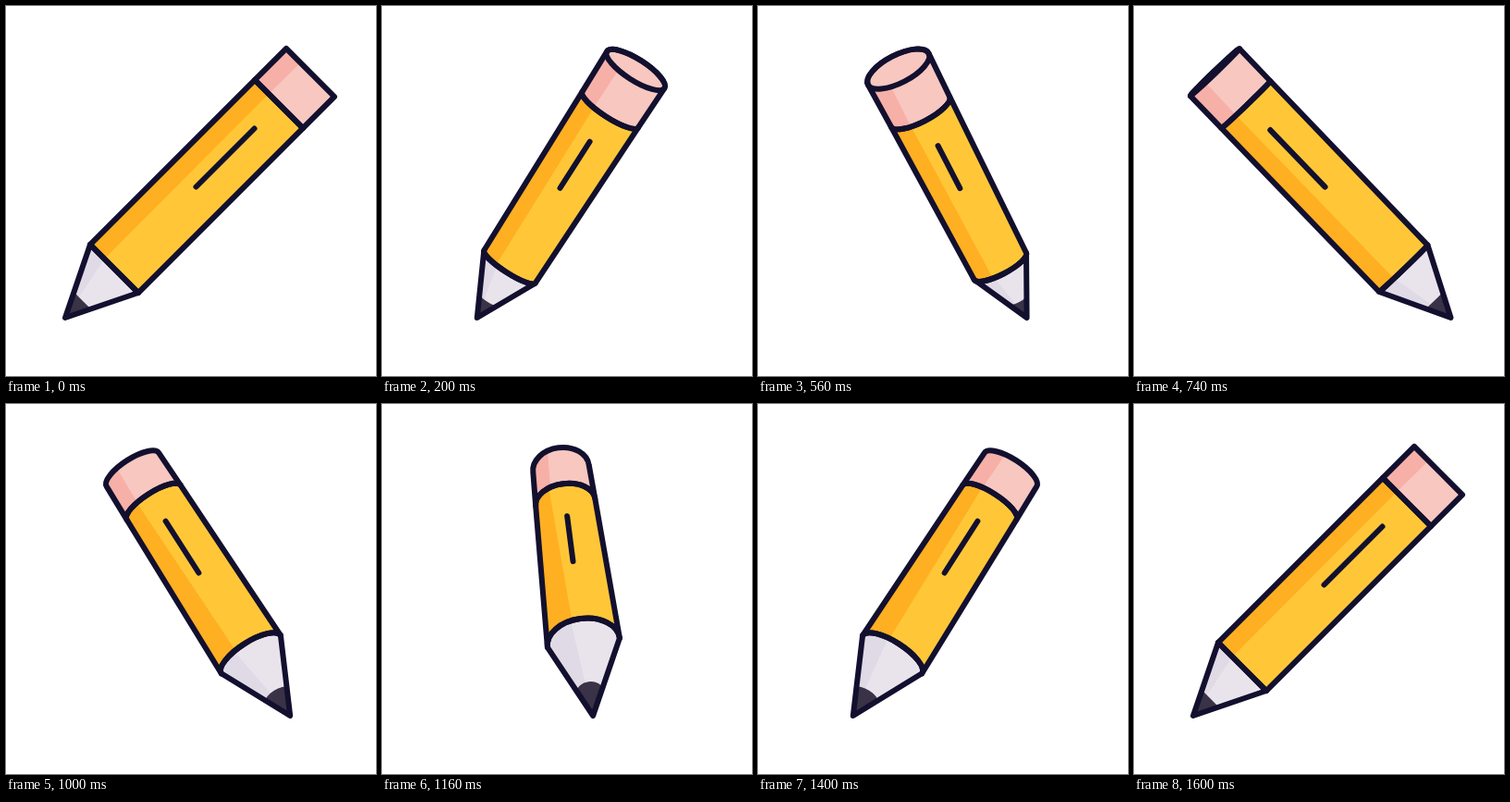
An HTML page with a canvas for the animation above (1620 ms loop, 400 by 400 pixels).

```html
<!DOCTYPE html>
<html lang="en">
<head>
<meta charset="utf-8">
<title>Spinning pencil</title>
<style>
  html, body { margin: 0; width: 100%; height: 100%; overflow: hidden; background: #fff; }
  canvas { display: block; width: 400px; height: 400px; }
</style>
</head>
<body>
<canvas id="stage" width="400" height="400"></canvas>
<script>
const ctx = document.getElementById('stage').getContext('2d');
const LOOP = 1620, TURN = 1600, STEP = 20;
const INK = '#12102e';

// Rings: [height above the tip, half width, bulge, shade edge] for each view.
const RINGS = {
  base: { side: [53, 36.8, 0, -15], front: [57, 29, -13.5, -12], back: [79.5, 39.4, 27, -8] },
  seam: { side: [231, 36.8, 0, -15.5], front: [218.5, 35, -17, -17], back: [230.5, 32.2, 21, -15] },
  top: { side: [265, 36.8, 0, -15], front: [271, 37, -23, -16], back: [267, 30.3, 23.5, -13] }
};
// Both ends of the line on the barrel.
const MARK = { side: [141.5, 204.5], front: [139, 176], back: [167.5, 216] };

// depth: 1 = eraser towards the viewer, -1 = away
function mix(views, depth) {
  const to = depth > 0 ? views.front : views.back;
  return views.side.map((v, i) => v + (to[i] - v) * Math.abs(depth));
}

function arc(ring, leftToRight) {
  const up = ring.b >= 0;
  ctx.ellipse(0, -ring.y, ring.w, Math.abs(ring.b), 0,
    leftToRight ? Math.PI : 0, leftToRight ? 0 : Math.PI, leftToRight ? !up : up);
}

// A section of the pencil between two rings, lit from the right.
function section(low, high, light, dark) {
  const path = () => {
    ctx.beginPath();
    if (low.w) arc(low, true); else ctx.moveTo(0, 0);
    arc(high, false);
    ctx.closePath();
  };
  const edge = t => [low.k + (high.k - low.k) * t, -low.y - (high.y - low.y) * t];
  path();
  ctx.fillStyle = light;
  ctx.fill();
  ctx.save();
  ctx.clip();
  const from = edge(-1), to = edge(2);
  ctx.beginPath();
  ctx.moveTo(...from);
  ctx.lineTo(...to);
  ctx.lineTo(-90, to[1]);
  ctx.lineTo(-90, from[1]);
  ctx.fillStyle = dark;
  ctx.fill();
  ctx.restore();
  return path;
}

function draw(time) {
  const angle = 2 * Math.PI * time / TURN;
  const sin = Math.sin(angle);
  const depth = sin * Math.abs(sin);
  const swing = Math.cos(angle) * (1 + 0.05 * sin * sin);
  const tilt = swing * Math.PI / 4;
  const stretch = 1 / Math.cos(tilt);
  const ring = name => {
    const [h, w, b, k] = mix(RINGS[name], depth);
    return { y: h * stretch, w, b, k };
  };
  const tip = { y: 0, w: 0, b: 0, k: 0 };
  const base = ring('base'), seam = ring('seam'), top = ring('top');
  const rim = { ...top, b: Math.abs(top.b) };

  ctx.setTransform(1, 0, 0, 1, 0, 0);
  ctx.fillStyle = '#fff';
  ctx.fillRect(0, 0, 400, 400);
  ctx.translate(205 - 141 * swing, 337);
  ctx.rotate(tilt);
  ctx.lineWidth = 6;
  ctx.lineCap = ctx.lineJoin = 'round';
  ctx.strokeStyle = INK;

  const outlines = [
    section(seam, rim, '#f7c7c0', '#f6b0a7'),
    section(base, seam, '#ffc737', '#ffaf22'),
    section(tip, base, '#e9e4ec', '#e0dae6')
  ];

  const lead = 0.35;
  ctx.beginPath();
  ctx.moveTo(0, 0);
  arc({ y: base.y * lead, w: base.w * lead, b: base.b * lead }, true);
  ctx.fillStyle = '#3a3246';
  ctx.fill();

  if (depth > 0) {
    outlines.push(() => {
      ctx.beginPath();
      ctx.ellipse(0, -top.y, top.w, rim.b, 0, 0, 2 * Math.PI);
    });
    outlines[3]();
    ctx.fillStyle = '#f7c7c0';
    ctx.fill();
  }
  for (const path of outlines) {
    path();
    ctx.stroke();
  }

  const [start, end] = mix(MARK, depth);
  ctx.beginPath();
  ctx.moveTo(0, -start * stretch);
  ctx.lineTo(0, -end * stretch);
  ctx.stroke();
}

function tick() {
  const time = performance.now() % LOOP;
  draw(Math.floor(time / STEP) * STEP);
  requestAnimationFrame(tick);
}
tick();
</script>
</body>
</html>
```
